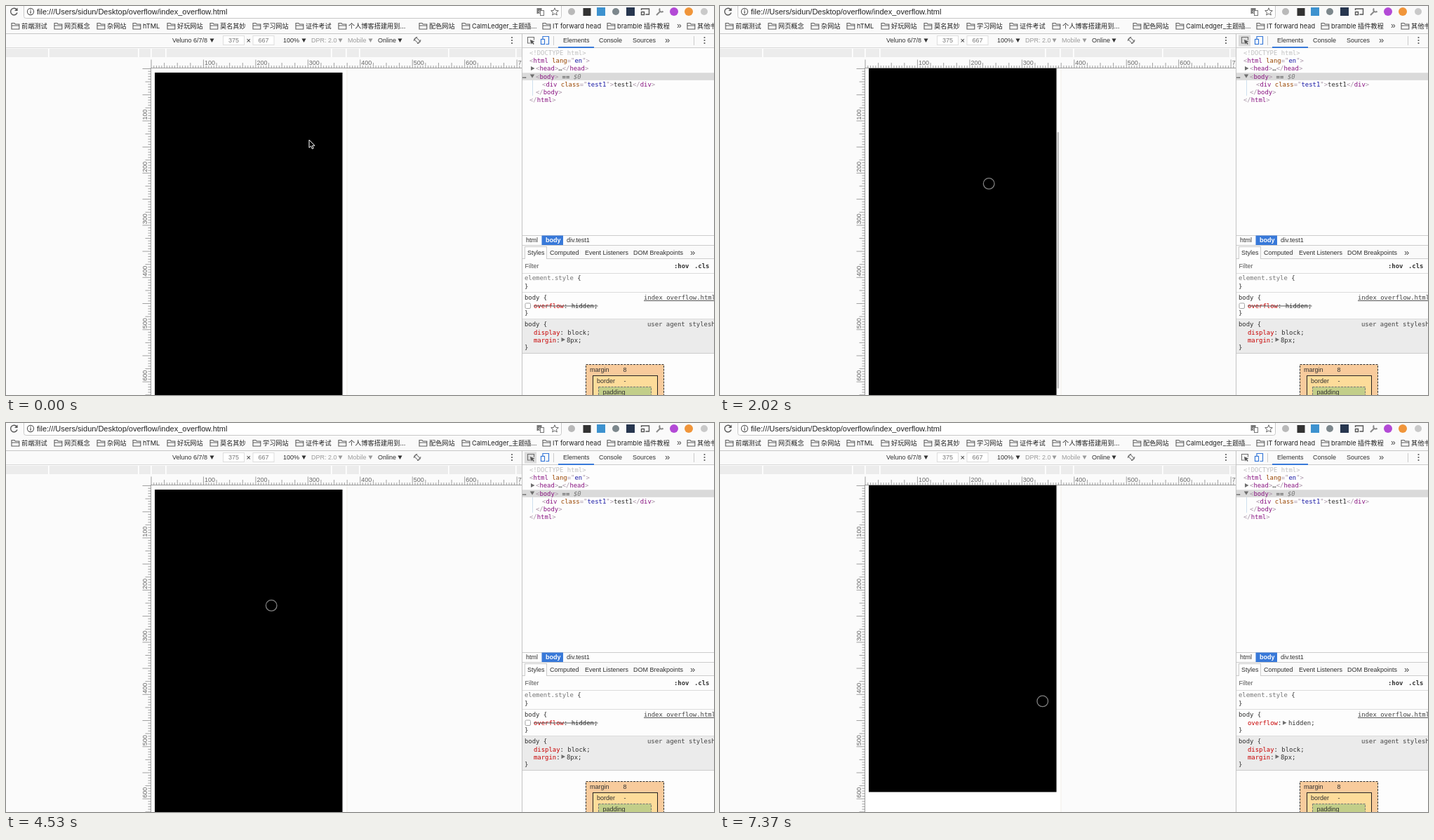
An HTML page for the animation above (8 s loop, 1009 by 555 pixels).

```html
<!DOCTYPE html>
<html lang="zh">
<head>
<meta charset="utf-8">
<title>overflow demo</title>
<style>
html, body { margin: 0; width: 100%; height: 100%; overflow: hidden; background: #fff; }
svg { display: block; width: 100%; height: 100%; }
text { white-space: pre; }
.ui { font-family: "Liberation Sans", Arial, sans-serif; }
.bm { font-family: Inter, "Noto Sans CJK SC", "Noto Sans CJK", sans-serif; }
.mono { font-family: "DejaVu Sans Mono", Menlo, monospace; }
</style>
</head>
<body>
<svg id="stage" viewBox="0 0 1009 555">
  <defs><clipPath id="view"><rect x="207" y="89" width="278" height="466"/></clipPath></defs>
</svg>
<script>
const stage = document.getElementById("stage");
const BLUE = "#3879d9", INK = "#303030", ICON = "#6e6e6e", PANEL = "#fafafa";

function add(tag, attrs, parent = stage) {
  const e = document.createElementNS("http://www.w3.org/2000/svg", tag);
  for (const k in attrs) e.setAttribute(k, attrs[k]);
  parent.appendChild(e);
  return e;
}
const rect = (x, y, width, height, fill, more, parent) =>
  add("rect", { x, y, width, height, fill, ...more }, parent);
const path = (d, stroke, more, parent) =>
  add("path", { d, stroke, fill: "none", ...more }, parent);
const disc = (cx, cy, r, fill, more, parent) =>
  add("circle", { cx, cy, r, fill, ...more }, parent);
const hline = (y, x0, x1, color) => rect(x0, y, x1 - x0, 1, color);

function label(x, y, str, fill = INK, size = 9, cls = "ui", more = {}, parent) {
  const e = add("text", { x, y, fill, "font-size": size, class: cls, ...more }, parent);
  e.textContent = str;
  return e;
}
// parts: alternating text and colour
function mono(x, y, parts, more, parent) {
  const e = label(x, y, "", INK, 8.94, "mono", more, parent);
  for (let i = 0; i < parts.length; i += 2)
    add("tspan", { fill: parts[i + 1] }, e).textContent = parts[i];
  return e;
}
const right = (x, y, parent) => path(`M${x} ${y - 3}l5.5 3l-5.5 3z`, "none", { fill: ICON }, parent);
const down = (x, y, fill) => path(`M${x} ${y - 2.5}h6l-3 5.5z`, "none", { fill });
const dots = (x, y) => [-4, 0, 4].forEach(d => disc(x, y + d, 1.1, "#5a5a5a"));

function addressBar() {
  rect(0, 0, 1009, 39, PANEL);
  rect(25.5, -6, 766, 23.5, "#fff", { rx: 3, stroke: "#c8c8c8" });
  path("M15.6 5.6A4.8 4.8 0 1 0 16 9.5", "#5a5a5a", { "stroke-width": 1.4 });
  path("M16.6 2.5v4.6h-4.6z", "none", { fill: "#5a5a5a" });
  disc(35, 8, 4.6, "none", { stroke: "#555", "stroke-width": 1.1 });
  rect(34.4, 7.2, 1.3, 3.6, "#555");
  rect(34.4, 5, 1.3, 1.3, "#555");
  label(44, 12, "file:///Users/sidun/Desktop/overflow/index_overflow.html", "#222", 11);

  rect(756.5, 3, 7, 8, "#777");
  label(758, 9.5, "文", "#fff", 5, "bm");
  rect(761.5, 6.5, 5, 7, "#fff", { stroke: "#777" });
  path("M782 2.8l1.5 3.6 3.8.3-2.9 2.5.9 3.8-3.3-2.1-3.3 2.1.9-3.8-2.9-2.5 3.8-.3z", "#666");

  disc(806, 8, 5, "#b9b9b9");
  rect(822.5, 3, 11, 11, "#333");
  rect(842, 2, 12, 12, "#3d92cf");
  disc(869, 8, 5, "#7c878c");
  rect(884, 2, 12, 12, "#27364f");
  path("M905.5 6v-2h11v8h-5M905.5 8.5h4v4h-4z", "#555", { "stroke-width": 1.4 });
  path("M927 13l6-6M932 3.5a3 3 0 1 0 4.5 4", "#888", { "stroke-width": 2 });
  disc(952, 8, 6, "#b34ad6");
  disc(973, 8, 6, "#f0953a");
  disc(995, 8, 5, "#c9c9c9");
}

function bookmarks() {
  const items = [[8, "前端测试"], [69, "网页概念"], [130, "杂网站"], [181, "hTML"], [230, "好玩网站"],
    [291, "莫名其妙"], [352, "学习网站"], [413, "证件考试"], [474, "个人博客搭建用到…"], [589, "配色网站"],
    [650, "CalmLedger_主题插…"], [765, "IT forward head"], [857, "bramble 插件教程"], [971, "其他书签"]];
  for (const [x, name] of items) {
    path(`M${x} 33v-8.5h4l1.2 1.5h5.6v7zM${x} 28h10.8`, "#5c5c5c", { "stroke-width": 1.1 });
    label(x + 14, 32, name, "#222", 9.2, "bm");
  }
  label(956, 32, "»", "#444", 12);
  hline(39, 0, 1009, "#c6c6c6");
}

function deviceBar() {
  rect(0, 40, 735, 20, PANEL);
  label(237, 52, "Veluno 6/7/8");
  down(290.5, 49, INK);
  for (const [x, n] of [[309.5, "375"], [352, "667"]]) {
    rect(x, 42.5, 30, 13, "#fff", { stroke: "#dedede" });
    label(x + 15, 52, n, "#777", 9, "ui", { "text-anchor": "middle" });
  }
  label(342.5, 53, "×", INK, 11);
  label(395, 52, "100%");
  down(421.5, 49, INK);
  label(435, 52, "DPR: 2.0", "#9a9a9a");
  down(473.5, 49, "#9a9a9a");
  label(487, 52, "Mobile", "#9a9a9a");
  down(516.5, 49, "#9a9a9a");
  label(530, 52, "Online");
  down(558.5, 49, INK);
  rect(584, 45.5, 4, 7, "none", { stroke: ICON, transform: "rotate(-45 586 49)" });
  path("M581.4 50a4.8 4.8 0 0 1 4.8-5.6M590.8 48a4.8 4.8 0 0 1-4.8 5.6", ICON);
  dots(721, 49);
  hline(59, 0, 735, "#d8d8d8");
  rect(0, 60, 735, 15, "#fbfbfb");
  rect(0, 61, 735, 12, "#ececec");
  for (const x of [60, 188, 206, 227, 463, 484, 503, 630, 726]) rect(x, 61, 1.6, 12, "#fff");
}

function rulers() {
  const U = 0.7445;
  rect(0, 75, 735, 480, "#fbfbfb");
  rect(207, 89, 278, 466, "#fff");
  rect(485.5, 89, 1, 466, "#f3efea");
  const size = v => v % 100 == 0 ? 12.5 : v % 25 == 0 ? 8 : 4;
  let across = "M206.5 88.5H735", along = "M206.5 88.5V555";
  for (let v = 0; v <= 710; v += 5) {
    const p = v * U, n = size(v);
    across += `M${207 + p} 89v${-n}`;
    if (p < 466) along += `M206.5 ${89.5 + p}h${-(v % 50 ? n : 12)}`;
    if (v && v % 100 == 0) {
      label(208.5 + p, 84, v, "#666");
      if (p < 466) label(0, 0, v, "#666", 9, "ui", { transform: `translate(201 ${88 + p}) rotate(-90)` });
    }
  }
  path(across + along, "#8a8a8a", { "stroke-width": 0.8 });
}

function toolsHeader() {
  rect(735, 40, 274, 515, "#fdfdfd");
  rect(736, 40, 273, 19, PANEL);
  const hover = rect(739, 41.5, 17, 16, "#dcdcdc");
  path("M747 53h-3.5v-8.5h9v4", ICON, { "stroke-width": 1.1 });
  path("M747 48l6.5 2.7-2.7 1 2 2.4-1.2 1-2-2.4-1.5 2z", "none", { fill: "#555" });
  path("M765 47v-3.5h8.5v11h-4", BLUE, { "stroke-width": 1.2 });
  rect(762.5, 47.5, 5, 7, "#fff", { stroke: BLUE, "stroke-width": 1.2 });
  rect(780, 43, 1, 13, "#ccc");
  label(794, 52, "Elements");
  label(845, 52, "Console");
  label(893, 52, "Sources");
  label(939, 53, "»", "#444", 13);
  rect(980, 43, 1, 13, "#ccc");
  dots(995.5, 49);
  hline(59, 736, 1009, "#ccc");
  rect(787, 58, 51, 2, BLUE);
  return hover;
}

function domTree() {
  const B = "#a894a6", T = "#881280", A = "#994500", V = "#1a1aa6";
  const tag = name => ["<", B, name, T, ">", B];
  const end = name => ["</", B, name, T, ">", B];
  rect(736, 95.3, 273, 10.6, "#dadada");
  mono(746, 70, ["<!DOCTYPE html>", "#c0c0c0"]);
  mono(746, 81, ["<", B, "html", T, " lang", A, "=\"", B, "en", V, "\">", B]);
  right(748, 89);
  mono(755, 92.3, [...tag("head"), "…", INK, ...end("head")]);
  mono(736, 103, ["…", "#555"], { "font-weight": "bold" });
  path("M746.8 97.4h6.4l-3.2 5.4z", "none", { fill: ICON });
  mono(755, 103.5, [...tag("body"), " == ", INK]);
  mono(809, 103.5, ["$0", "#777"], { "font-style": "italic" });
  rect(750, 106, 1, 22, "#cfe0ee");
  mono(764, 114.8, ["<", B, "div", T, " class", A, "=\"", B, "test1", V, "\">", B, "test1", INK, ...end("div")]);
  mono(755, 126, end("body"));
  mono(746, 137, end("html"));

  hline(327, 736, 1009, "#ccc");
  label(741, 337.3, "html");
  rect(763.5, 327.5, 30.5, 13.5, BLUE);
  label(769, 337.3, "body", "#fff", 9, "ui", { "font-weight": "bold" });
  label(799, 337.3, "div.test1");
}

function stylePane() {
  const R = "#c80000";
  rect(736, 341, 273, 20, PANEL);
  hline(341, 736, 1009, "#ccc");
  hline(360, 736, 1009, "#ccc");
  rect(739.5, 343.5, 31, 18, "#fff", { stroke: "#ccc" });
  rect(736, 361, 273, 20, "#fdfdfd");
  label(743, 355, "Styles");
  label(775, 355, "Computed");
  label(825, 355, "Event Listeners");
  label(894, 355, "DOM Breakpoints");
  label(975, 355.5, "»", "#444", 13);
  label(739.5, 374, "Filter", "#555");
  mono(952, 374, [":hov", INK], { "font-weight": "bold" });
  mono(981, 374, [".cls", INK], { "font-weight": "bold" });
  hline(381, 736, 1009, "#dcdcdc");
  mono(739, 391, ["element.style", "#777", " {", INK]);
  mono(739, 403, ["}", INK]);
  hline(408, 736, 1009, "#dcdcdc");
  mono(739, 419, ["body {", INK]);
  mono(909, 419, ["index_overflow.html", "#444"]);
  hline(420, 909, 1009, "#555");

  const off = add("g", {}), on = add("g", {}), box = add("g", {});
  mono(752, 431, ["overflow", R, ": hidden;", INK], {}, off);
  rect(752, 427.5, 91.5, 1, "#555", {}, off);
  mono(752, 431, ["overflow", R, ":", INK], {}, on);
  right(802, 427.7, on);
  mono(810, 431, ["hidden;", INK], {}, on);
  rect(740, 424, 7.5, 7.5, "#fff", { rx: 1.5, stroke: "#a5a5a5" }, box);
  const tick = path("M741.5 427.8l2 2 3.2-4.4", "#333", { "stroke-width": 1.3 }, box);

  mono(739, 441, ["}", INK]);
  rect(736, 447, 273, 48, "#ebebeb");
  hline(446, 736, 1009, "#dcdcdc");
  mono(739, 457, ["body {", INK]);
  mono(914, 457, ["user agent stylesheet", "#444"]);
  mono(752, 468.5, ["display", R, ": block;", INK]);
  mono(752, 479.5, ["margin", R, ":", INK]);
  right(791.5, 476);
  mono(799, 479.5, ["8px;", INK]);
  mono(739, 489.5, ["}", INK]);
  hline(495, 736, 1009, "#ccc");

  const dash = { "stroke-dasharray": "3 1.5" };
  rect(826.5, 511.5, 111, 60, "#f8cb9c", { stroke: "#333", ...dash });
  rect(836.5, 527.5, 92, 50, "#fddc9a", { stroke: "#222" });
  rect(844.5, 543.5, 75, 50, "#c2ce89", { stroke: "#777", ...dash });
  label(832, 522, "margin");
  label(879.5, 522, "8");
  label(842, 538, "border");
  label(880.5, 538, "-");
  label(850.5, 553.5, "padding");
  rect(735, 40, 1, 515, "#c4c4c4");
  return { off, on, box, tick };
}

addressBar();
bookmarks();
deviceBar();
rulers();
const hover = toolsHeader();
domTree();
const rule = stylePane();

const view = add("g", { "clip-path": "url(#view)" });
const page = rect(212, 95, 267.5, 631.5, "#000", {}, view);
const bar = rect(480.5, 92, 2.6, 366, "#c1c1c1", { rx: 1.3 }, view);
const touch = disc(0.2, 0.4, 7.8, "#000", { stroke: "#808080", "stroke-width": 1.3 });
const arrow = path("M0 0V11.2L2.6 8.8L4.3 12.8L6.2 12L4.5 8.2H8Z", "#fff", { fill: "#000" });

// the picture advances in short bursts: start, end, number of steps
const bursts = [[300, 980, 5], [1280, 2310, 8], [2460, 3360, 7], [3510, 4530, 8],
  [4980, 6020, 8], [6170, 6470, 3], [6920, 7370, 4]];
function snap(t) {
  let last = 0;
  for (const [a, b, n] of bursts)
    for (let i = 0; i < n; i++) {
      const s = Math.floor((a + (b - a) * i / (n - 1)) / 10) * 10;
      if (s <= t) last = s;
    }
  return last;
}
// keys: [time, value], linear between, held at both ends
function track(keys, t) {
  let [pt, pv] = keys[0];
  if (t <= pt) return pv;
  for (const [kt, kv] of keys.slice(1)) {
    if (t < kt) return pv + (kv - pv) * (t - pt) / (kt - pt);
    pt = kt; pv = kv;
  }
  return pv;
}
const scroll = [[980, 0], [1280, 80], [1430, 177], [1580, 170], [1870, 153], [2310, 146], [2610, 146],
  [2760, 100], [2910, 25], [3060, -14], [3210, -7], [3360, -3], [3510, 0],
  [4830, 0], [4980, 60], [5130, 180], [5280, 208], [5570, 200]];
const barFade = [[980, 0], [1280, 1], [2010, 1], [2310, 0], [2460, 1], [3510, 1], [3800, 0],
  [4530, 0], [4980, 1], [5570, 1], [5870, 0]];
const moveX = [[150, 432], [980, 383], [3660, 383], [4100, 779], [4530, 378], [5420, 378], [6020, 731],
  [6470, 741], [6920, 741], [7370, 459.5]];
const moveY = [[150, 191], [980, 253], [3660, 253], [4100, 430], [4530, 260], [5420, 260], [6020, 392],
  [6470, 427], [6920, 427], [7370, 396.5]];

const show = (e, yes) => e.setAttribute("visibility", yes ? "visible" : "hidden");

function draw(time) {
  const t = snap(time), s = track(scroll, t);
  page.setAttribute("y", 95 - s);
  bar.setAttribute("y", 92 + 0.582 * Math.max(0, s));
  bar.setAttribute("opacity", track(barFade, t));

  const x = track(moveX, t), y = track(moveY, t), inside = t >= 300 && x < 486;
  for (const e of [touch, arrow]) e.setAttribute("transform", `translate(${x} ${y})`);
  show(touch, inside);
  show(arrow, !inside);

  show(hover, t >= 640 && t < 6920);
  show(rule.off, t < 6920);
  show(rule.on, t >= 6920);
  show(rule.box, t < 7070);
  show(rule.tick, t >= 6920 && t < 7070);
}

const start = performance.now();
function loop() {
  draw((performance.now() - start) % 8000);
  requestAnimationFrame(loop);
}
loop();
</script>
</body>
</html>
```
